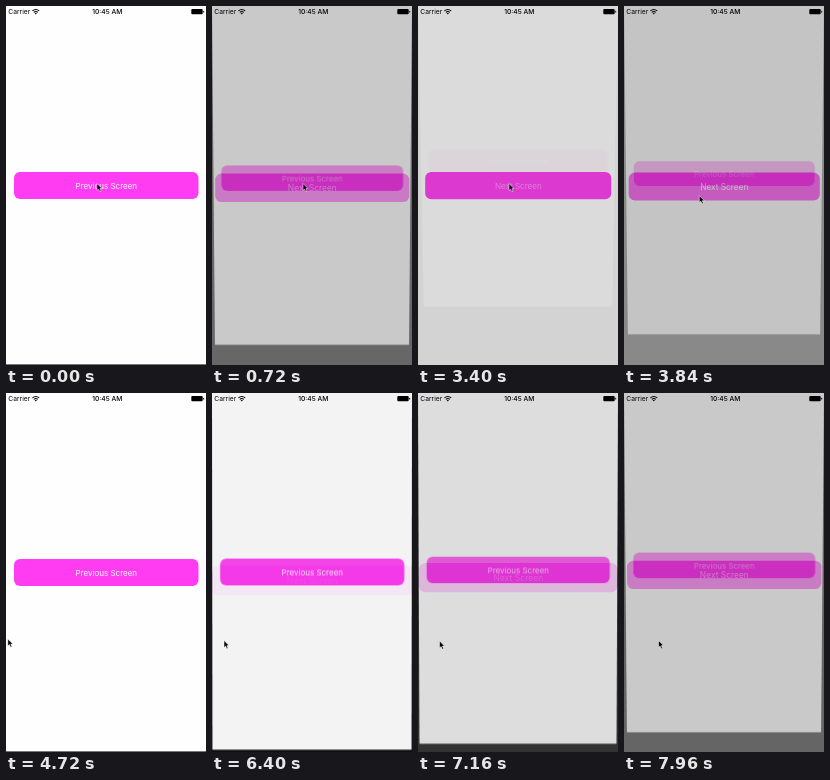
An HTML page that plays this animation: 200x359 px, repeating every 8 s.

```html
<!DOCTYPE html>
<html lang="en">
<head>
<meta charset="utf-8">
<title>Screen transition</title>
<style>
  html, body { margin: 0; width: 100%; height: 100%; overflow: hidden; background: #000; }
  #stage { position: relative; width: 200px; height: 359px; overflow: hidden; background: #000; }
  svg { position: absolute; left: 0; top: 0; width: 200px; height: 359px; font-family: Inter, Roboto, sans-serif; }
  .screen { overflow: hidden; }
  .screen text { font-size: 8px; fill: #fff; text-anchor: middle; }
  #prev { transform-origin: 50% 0; }
  #next { transform-origin: 50% 50%; }
</style>
</head>
<body>
<div id="stage">
  <svg id="prev" class="screen" viewBox="0 0 200 359">
    <rect width="200" height="359" fill="#fefefe"/>
    <rect y="358" width="200" height="1" fill="#777"/>
    <rect x="8" y="166" width="184.5" height="27" rx="6" fill="#ff3cf2"/>
    <text x="100.3" y="182.8">Previous Screen</text>
  </svg>
  <svg id="next" class="screen" viewBox="0 0 200 359">
    <rect width="200" height="359" fill="#fefefe"/>
    <rect y="358" width="200" height="1" fill="#777"/>
    <rect x="8" y="166" width="184.5" height="27" rx="6" fill="#ff3cf2"/>
    <text x="100.3" y="182.8">Next Screen</text>
  </svg>
  <svg viewBox="0 0 200 359">
    <text x="2.3" y="8" font-size="6.7">Carrier</text>
    <g fill="none" stroke="#000" stroke-width="1.1">
      <path d="M26.4 4.9Q29.8 2 33.2 4.9"/>
      <path d="M27.8 6.4Q29.8 4.7 31.8 6.4"/>
    </g>
    <path d="M28.7 7.2Q29.8 6.4 30.9 7.2L29.8 8.4Z"/>
    <text x="101.3" y="8" font-size="6.7" font-weight="500" text-anchor="middle">10:45 AM</text>
    <rect x="185.3" y="3" width="11.4" height="5.2" rx="1"/>
    <rect x="197.2" y="4.7" width="1" height="1.9" rx=".5"/>
    <path id="cursor" d="M0 0V7L1.6 5.6L2.8 8.3L4 7.8L2.9 5.1H5Z" stroke="#fff" stroke-width=".5"/>
  </svg>
</div>
<script>
const LOOP = 8000, TAP_BACK = 40, TAP_NEXT = 3080, SPAN = 1640;
const $ = id => document.getElementById(id);
const prev = $('prev'), next = $('next'), cursor = $('cursor');
const prevLabel = prev.querySelector('text'), nextLabel = next.querySelector('text');

// Cursor path: time, x, y
const path = [
  [0, 91, 177.5], [3700, 91, 177.5], [4500, 2, 246], [5200, 1.5, 246],
  [5600, 3, 246.5], [6400, 12, 247.5], [7160, 21.5, 248], [7960, 34.5, 247.5], [LOOP, 35, 247.5]
];

const clamp = v => Math.min(1, Math.max(0, v));
const ease = v => { v = clamp(v); return 0.7 * v + 0.3 * v * v * (3 - 2 * v); };

function cursorAt(t) {
  const i = path.findIndex((k, n) => n > 0 && t <= k[0]);
  const [t0, x0, y0] = path[i - 1], [t1, x1, y1] = path[i];
  const u = (t - t0) / (t1 - t0);
  return [x0 + (x1 - x0) * u, y0 + (y1 - y0) * u];
}

// 0: second screen shown, 1: first screen shown
function progress(t, x) {
  if (t < TAP_NEXT) return ease((t - TAP_BACK) / SPAN);
  if (t < TAP_NEXT + SPAN) return 1 - ease((t - TAP_NEXT) / SPAN);
  return clamp((x - 8) / 67);
}

// Pressed label dims, then recovers
function labelAlpha(dt) {
  if (dt <= 0) return 1;
  return Math.max(1 - dt / 60, 0.3 + 0.7 * clamp((dt - 250) / 450));
}

function draw(t) {
  const [x, y] = cursorAt(t);
  const p = progress(t, x);
  const zoom = 0.107 * Math.pow(1 - p, 1.4);
  prev.style.opacity = 1 - Math.pow(p, 1.15);
  prev.style.transform = p ? `perspective(2700px) rotateX(${-0.57 * p}rad)` : 'none';
  next.style.opacity = p;
  next.style.transform = `translateY(${850 * zoom * zoom}px) scale(${1 + zoom})`;
  prevLabel.style.opacity = t < TAP_NEXT ? labelAlpha(t - TAP_BACK) : 1;
  nextLabel.style.opacity = t < TAP_NEXT + SPAN ? labelAlpha(t - TAP_NEXT) : 1;
  cursor.setAttribute('transform', `translate(${x} ${y})`);
}

const start = performance.now();
function frame() {
  draw((performance.now() - start) % LOOP);
  requestAnimationFrame(frame);
}
draw(0);
requestAnimationFrame(frame);
</script>
</body>
</html>
```
